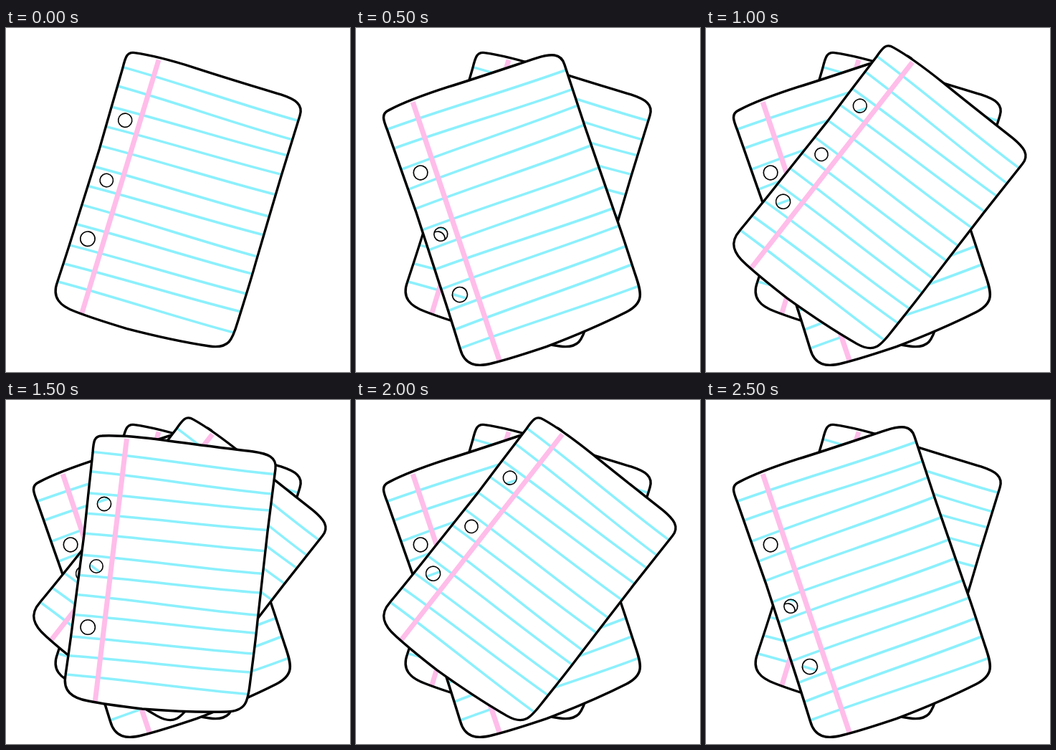
Recreate the animation shown at these times as an HTML page. Size 480 by 480 pixels, loop 3 s.

```html
<!DOCTYPE html>
<html lang="en">
<head>
<meta charset="utf-8">
<title>Stack of paper</title>
<style>
  html, body { margin: 0; width: 100%; height: 100%; overflow: hidden; background: #fff; }
  svg { display: block; width: 100%; height: 100%; }
  #second { animation: second 3s step-end infinite; }
  #third { animation: third 3s step-end infinite; }
  #top { animation: top 3s step-end infinite; }
  @keyframes second { 0% { visibility: hidden } 16.666%, 100% { visibility: visible } }
  @keyframes third { 0%, 83.333%, 100% { visibility: hidden } 33.333% { visibility: visible } }
  @keyframes top { 0%, 66.666%, 100% { visibility: hidden } 50% { visibility: visible } }
</style>
</head>
<body>
<svg viewBox="0 0 480 480" fill="none">
  <defs>
    <!-- Sheet origin: top end of the pink margin -->
    <g id="sheet" transform="translate(-168 -55)">
      <path id="paper" fill="#fff" fill-rule="evenodd"/>
      <path id="rules" stroke="#8cf0fc" stroke-width="3.5"/>
      <path d="M168.5 54L124.3 421" stroke="#ffbdea" stroke-width="7"/>
      <path id="holes" stroke="#000" stroke-width="1.6"/>
      <path id="edge" stroke="#000" stroke-width="3.4" stroke-linejoin="round"/>
    </g>
  </defs>
  <use href="#sheet" transform="translate(212.4 45.5) rotate(10)"/>
  <use id="second" href="#sheet" transform="translate(79.2 104.5) rotate(-25.4) scale(1.03)"/>
  <use id="third" href="#sheet" transform="translate(287 48.5) rotate(31.2) scale(.987)"/>
  <use id="top" href="#sheet" transform="translate(168 55)"/>
</svg>
<script>
  const draw = (id, d) => document.getElementById(id).setAttribute('d', d);

  const edge = 'M121 74C122 58 123 50 134 50C160 49 190 52 220 56C262 62 305 67 345 72' +
    'C366 75 378 80 376 96C372 130 368 158 364.8 185C360 227 355.500 268 350.800 310C348 339 344 367 340.500 395' +
    'C337.500 421 335 434 308 435C268 436 228 434 190 431C165 428 140 425 115 420' +
    'C92 416 79 406 83 384C87.500 353 92 321 95.700 290C100 257 104.500 223 108.700 190C112.500 151 117 113 121 74Z';

  const circle = ([x, y, r]) =>
    `M${x - r} ${y}a${r} ${r} 0 1 0 ${2 * r} 0a${r} ${r} 0 1 0 ${-2 * r} 0Z`;
  const holes = [[137, 145, 9.6], [126, 232, 9.2], [114.2, 317, 10.2]].map(circle).join('');

  // Heights where each rule meets the left and right edges
  const left = [72.6, 99.8, 129.8, 158.3, 186, 216, 244.3, 271.6, 299.5, 330, 356.8, 383];
  const right = [103.6, 131, 154, 181.6, 210.7, 242.3, 269, 300.3, 325.2, 354, 380, 410.5];

  const rule = (y1, i) => {
    const y2 = right[i], x1 = 122 - (y1 - 72) * 0.122, x2 = 374 - (y2 - 104) * 0.1156;
    const w = (x2 - x1) / 3, bend = (y2 - y1) * 0.26;
    return `M${x1} ${y1}C${x1 + w} ${y1 + bend} ${x2 - w} ${y2 - bend} ${x2} ${y2}`;
  };

  draw('paper', edge + holes);
  draw('rules', left.map(rule).join(''));
  draw('holes', holes);
  draw('edge', edge);
</script>
</body>
</html>
```
